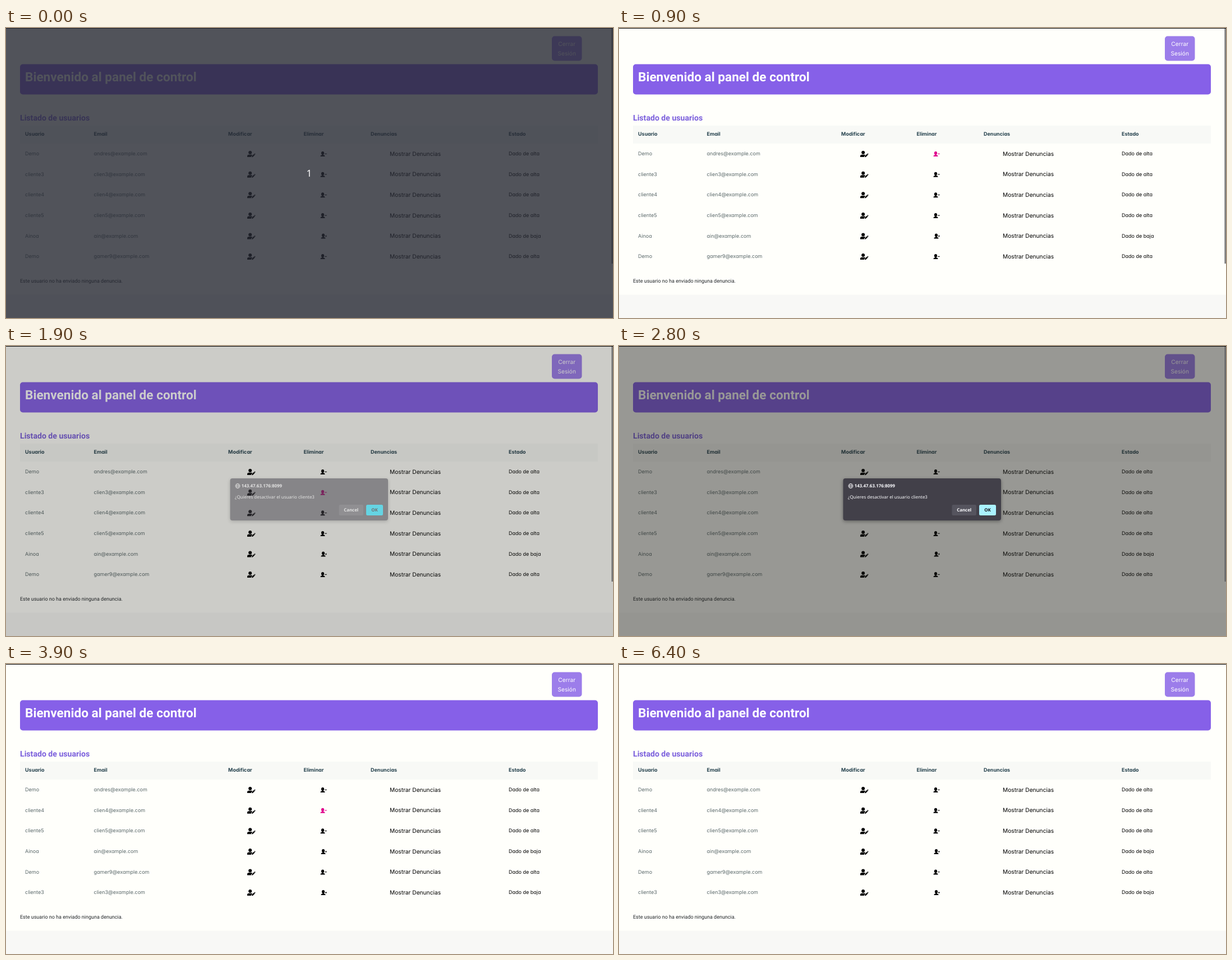
An HTML page for the animation above (6.7 s loop, 1082 px wide and 517 px high).

```html
<!DOCTYPE html>
<html lang="es">
<head>
<meta charset="utf-8">
<title>Panel de control</title>
<style>
html, body { margin: 0; width: 100%; height: 100%; overflow: hidden; background: #fffffb; }
svg { display: block; width: 1082px; height: 517px; }
text { white-space: pre; text-rendering: geometricPrecision; }
.cell { font: 9px Inter, sans-serif; font-feature-settings: "cv11"; }
.head { font: 700 9px Inter, sans-serif; font-feature-settings: "cv11"; fill: #24404c; }
.muted { fill: #5b696b; }
.btn { font: 10.2px Inter, sans-serif; }
.h1 { font: 700 22.6px Roboto, sans-serif; fill: #fff; }
.h2 { font: 700 14.1px Roboto, sans-serif; fill: #7b5fdc; }
.note { font: 9px Roboto, sans-serif; fill: #212529; }
.ui { font: 7.9px "Noto Sans", sans-serif; fill: #fbfbfe; }
.bold { font-weight: 700; }
.count { font: 17px "Noto Sans", sans-serif; fill: #fff; }
.mid { text-anchor: middle; }
</style>
</head>
<body>
<svg id="stage" viewBox="0 0 1082 517">
  <defs>
    <g id="edit">
      <circle cx="5.2" cy="3" r="3"/>
      <path d="M0 11V9.4Q0 6.6 3 6.6H7.4Q8.6 6.6 9.4 7.3L7.4 9.3L7 11Z"/>
      <path d="M8 11.2L8.4 9.2L12.1 5.5L13.7 7.1L10 10.8ZM12.5 5.1L13 4.6Q13.4 4.3 13.8 4.7L14.4 5.3Q14.8 5.7 14.4 6.2L14 6.7Z"/>
    </g>
    <g id="person">
      <ellipse cx="4" cy="3" rx="2.6" ry="3"/>
      <path d="M3 5H5V6.2L7.3 7Q8 7.4 8 9H0Q0 7.4 .7 7L3 6.2Z"/>
    </g>
    <g id="minus"><use href="#person"/><path d="M7.7 3.7H11.3V4.8H7.7Z"/></g>
    <g id="plus"><use href="#person" x="1"/><path d="M8.3 4H9.4V3H10.3V4H11.3V4.9H10.3V6H9.4V4.9H8.3Z"/></g>
    <filter id="shadow" x="-10%" y="-20%" width="120%" height="150%">
      <feDropShadow dx="0" dy="2" stdDeviation="3" flood-opacity=".35"/>
    </filter>
  </defs>

  <rect width="1082" height="517" fill="#fffffb"/>
  <rect y="475.5" width="1082" height="42" fill="#f8f8f6"/>
  <rect x="973" y="14.5" width="53.5" height="44" rx="5" fill="#9c7dea"/>
  <g class="btn mid" fill="#fff"><text x="999.7" y="32.4">Cerrar</text><text x="999.7" y="48.7">Sesión</text></g>
  <rect x="25" y="64.5" width="1030" height="54" rx="5" fill="#8660e8"/>
  <text class="h1" x="34" y="95">Bienvenido al panel de control</text>
  <text class="h2" x="25" y="165.3">Listado de usuarios</text>
  <rect x="25" y="174" width="1030" height="32" fill="#f8f9f6"/>
  <g id="heads"></g>
  <g id="before"></g>
  <g id="after"></g>
  <text class="note" x="25" y="454.4">Este usuario no ha enviado ninguna denuncia.</text>

  <rect id="dim" width="1082" height="517" fill="#1c1b18" opacity="0"/>
  <rect id="scrollbar" x="1079.6" y="1" width="2" height="419" fill="#5c5c5e"/>
  <g id="dialog" opacity="0">
    <rect x="399.5" y="236" width="281.5" height="75" rx="4" fill="#42414a" filter="url(#shadow)"/>
    <g fill="none" stroke="#fbfbfe" stroke-width=".8">
      <circle cx="413" cy="249.5" r="4"/><ellipse cx="413" cy="249.5" rx="1.8" ry="4"/><path d="M409 249.5H417"/>
    </g>
    <text class="ui bold" x="419.8" y="252.3">143.47.63.176:8099</text>
    <text class="ui" x="408" y="272">¿Quieres desactivar el usuario cliente3</text>
    <rect x="593.5" y="283" width="43.5" height="19" rx="2.5" fill="#55545e"/>
    <rect id="ok" x="642" y="283" width="30" height="19" rx="2.5"/>
    <text class="ui bold mid" x="615.2" y="295.3">Cancel</text>
    <text class="ui bold mid" x="657" y="295.3" style="fill:#15141a">OK</text>
  </g>
  <rect width="1082" height="1"/>
  <g id="countdown">
    <rect width="1082" height="517" fill="#262932" opacity=".8"/>
    <text class="count mid" x="540.3" y="265">1</text>
  </g>
  <path id="cursor" d="M0 0V9L2.1 7.1L3.5 10.3L5 9.6L3.6 6.6H6.4Z" fill="#111" stroke="#fff" stroke-width=".6"/>
</svg>
<script>
const $ = id => document.getElementById(id);
const LOOP = 6700, STEP = 100;

const make = (parent, tag, attrs, text = '') => {
  const node = document.createElementNS('http://www.w3.org/2000/svg', tag);
  for (const key in attrs) node.setAttribute(key, attrs[key]);
  node.textContent = text;
  return parent.appendChild(node);
};

const heads = { Usuario: 34, Email: 156.5, Modificar: 396, Eliminar: 530.5, Denuncias: 650, Estado: 896 };
for (const name in heads) make($('heads'), 'text', { class: 'head', x: heads[name], y: 192.4 }, name);

const users = [
  ['Demo', 'andres', true],
  ['cliente3', 'clien3', true],
  ['cliente4', 'clien4', true],
  ['cliente5', 'clien5', true],
  ['Ainoa', 'ain', false],
  ['Demo', 'gamer9', true]
];

// Returns the remove/restore icons so that hover can tint them.
function drawRows(parent, list) {
  return list.map(([name, mail, active], i) => {
    const y = 227.1 + i * 36.6;
    const text = (cls, x, value, dy = 0) => make(parent, 'text', { class: cls, x, y: y + dy }, value);
    text('cell muted', 34, name);
    text('cell muted', 156.5, mail + '@example.com');
    make(parent, 'use', { href: '#edit', x: 430, y: y - 8 });
    const icon = make(parent, 'use', { href: active ? '#minus' : '#plus', x: 560.5, y: y - 7 });
    text('btn', 684, 'Mostrar Denuncias', .6);
    text('cell', 896, active ? 'Dado de alta' : 'Dado de baja');
    return icon;
  });
}

const [first, gone, ...rest] = users;
const icons = drawRows($('before'), users);
const newIcons = drawRows($('after'), [first, ...rest, [gone[0], gone[1], false]]);

// Linear interpolation through [time, value] stops.
function track(stops, t) {
  const next = stops.findIndex(s => s[0] > t);
  if (next === 0) return stops[0][1];
  if (next < 0) return stops[stops.length - 1][1];
  const [t0, a] = stops[next - 1], [t1, b] = stops[next];
  return a + (b - a) * (t - t0) / (t1 - t0);
}

const tint = (icon, k) => icon.setAttribute('fill', `rgb(${224 * k},0,${140 * k})`);
const show = (id, on) => $(id).setAttribute('display', on ? 'inline' : 'none');

const hoverFirst = [[700, 0], [900, 1], [1000, 1], [1200, 0]];
const hoverSecond = [[1000, 0], [1200, 1]];
const hoverNew = [[3200, 0], [3400, 1], [4600, 1], [4800, 0]];
const modal = [[1800, 0], [2000, 1], [2900, 1], [3000, 0]];
const cursorX = [[4800, 480], [4900, 330], [5000, 150], [5100, 4], [5200, 14], [5300, 30.5]];
const cursorY = [[4800, 340], [4900, 430], [5000, 485], [5100, 494], [5200, 320], [5300, 156], [5400, 156], [5700, 34]];

function draw(now) {
  const t = Math.floor(now % LOOP / STEP) * STEP;
  show('countdown', t < 100);
  show('scrollbar', t < 3000);
  show('before', t < 3200);
  show('after', t >= 3200);
  tint(icons[0], track(hoverFirst, t));
  tint(icons[1], track(hoverSecond, t));
  tint(newIcons[1], track(hoverNew, t));
  const open = track(modal, t);
  $('dim').setAttribute('opacity', .45 * open);
  $('dialog').setAttribute('opacity', open);
  $('ok').setAttribute('fill', t < 2500 ? '#00ddff' : t < 2800 ? '#80ebff' : '#aaf2ff');
  show('cursor', t >= 4800 && t < 5800);
  $('cursor').setAttribute('transform', `translate(${track(cursorX, t)} ${track(cursorY, t)})`);
}

const start = performance.now();
function tick() {
  draw(performance.now() - start);
  requestAnimationFrame(tick);
}
tick();
</script>
</body>
</html>
```
